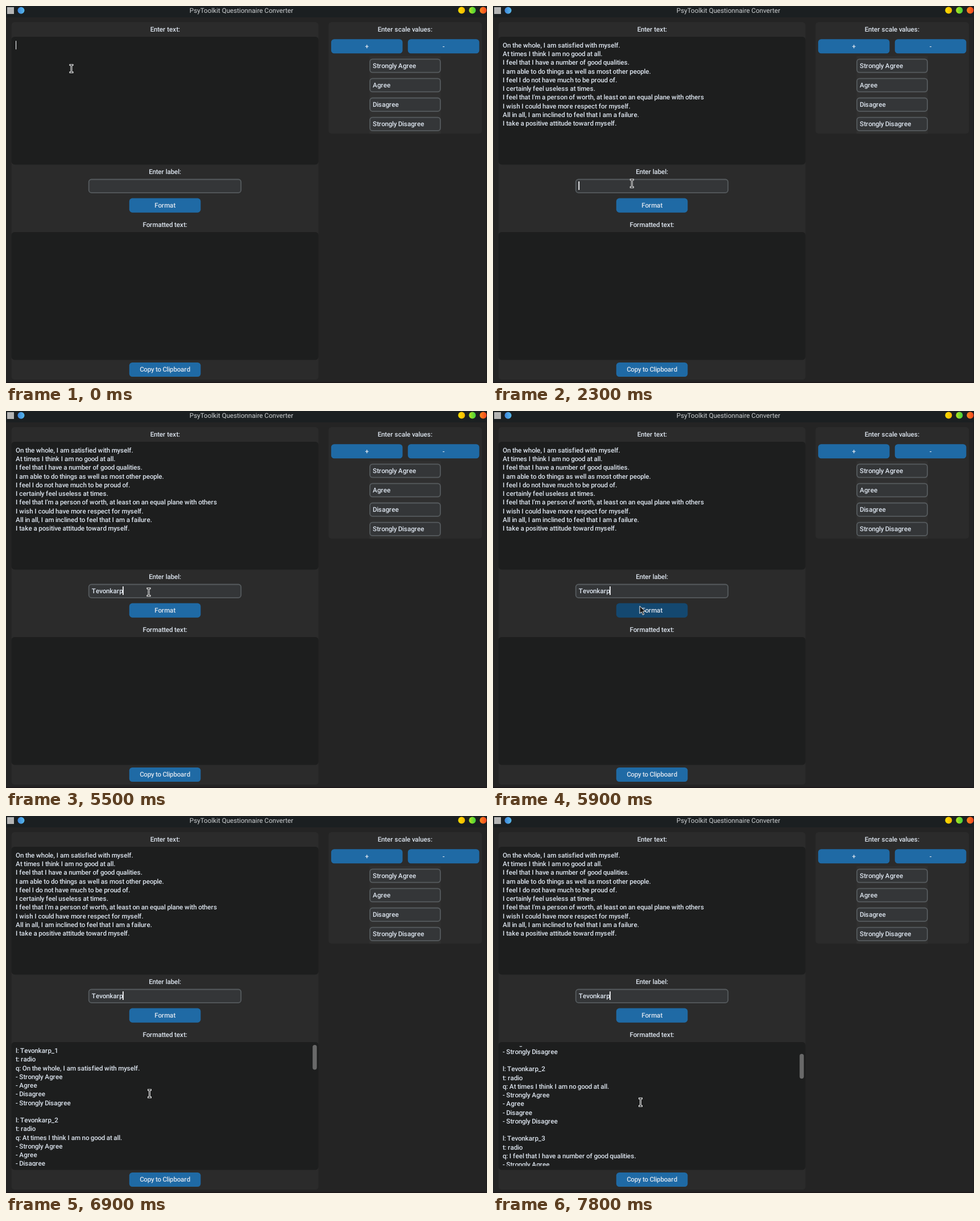
An HTML page that plays this animation: 846x662 px, repeating every 8 s.

```html
<!DOCTYPE html>
<html lang="en">
<head>
<meta charset="utf-8">
<title>PsyToolkit Questionnaire Converter</title>
<style>
  html, body { margin: 0; width: 846px; height: 662px; overflow: hidden; background: #242424; }
  svg { display: block; }
  text {
    font: 500 11.66px Roboto, sans-serif;
    fill: #dce4ee;
    text-rendering: geometricPrecision;
    white-space: pre;
  }
  .title { font-weight: 400; text-anchor: middle; fill: #cdd0d2; }
  .frame { fill: #2b2b2b; }
  .box { fill: #1d1e1e; }
  .button { fill: #1f6aa5; }
  .hover { fill: #144870; }
  .entry { fill: #343638; stroke: #565b5e; stroke-width: 1.8; }
  .caret { fill: #f4f6f8; }
</style>
</head>
<body>
<svg id="stage" width="846" height="662" viewBox="0 0 846 662">
  <defs>
    <linearGradient id="blue"><stop stop-color="#3f86dc"/><stop offset="1" stop-color="#56b8ea"/></linearGradient>
    <linearGradient id="yellow"><stop stop-color="#ffe000"/><stop offset="1" stop-color="#f7b500"/></linearGradient>
    <linearGradient id="green"><stop stop-color="#b4e61e"/><stop offset="1" stop-color="#3fd03c"/></linearGradient>
    <linearGradient id="red"><stop stop-color="#ff8a1c"/><stop offset="1" stop-color="#f2421f"/></linearGradient>
    <clipPath id="view"><rect x="12" y="404" width="525" height="210.5"/></clipPath>
    <path id="bar" d="M-2-6.6H2M0-6.6V6.6M-2 6.6H2"/>
  </defs>

  <rect width="846" height="20" fill="#1b1f21"/>
  <rect y="660" width="846" height="2" fill="#1d191b"/>
  <rect x="844.5" y="20" width="1.5" height="642" fill="#1e1e1e"/>
  <rect x="2" y="2" width="12" height="12" fill="#b4b4b4"/>
  <circle cx="26.5" cy="7.7" r="6" fill="url(#blue)"/>
  <circle cx="801.3" cy="7.6" r="6" fill="url(#yellow)"/>
  <circle cx="820.3" cy="7.6" r="6" fill="url(#green)"/>
  <circle cx="839.3" cy="7.6" r="6" fill="url(#red)"/>
  <text class="title" x="414" y="12">PsyToolkit Questionnaire Converter</text>

  <g id="ui"></g>
  <g id="typed"></g>
  <g clip-path="url(#view)"><g id="result"></g></g>
  <rect id="thumb" x="539.3" y="402" width="7.4" height="43.5" rx="3.7" fill="#696969"/>
  <rect id="textCaret" class="caret" width="1.1" height="15"/>
  <rect id="labelCaret" class="caret" y="308" width="1.8" height="15"/>

  <g id="beam" fill="none" stroke-linecap="square">
    <use href="#bar" stroke="#f2f2f2" stroke-width="3"/>
    <use href="#bar" stroke="#16181a" stroke-width="1"/>
  </g>
  <path id="arrow" d="M.5.5V13.5L3.7 10.8 6 16 8.3 15 6.2 10.1H10.6Z" fill="#16181a" stroke="#f2f2f2" stroke-linejoin="round"/>
</svg>

<script>
const $ = id => document.getElementById(id);
const LOOP = 8000, ZOOM = .897, LINE = 17 * ZOOM;
const NAME = 'Tevonkarp';
const scale = ['Strongly Agree', 'Agree', 'Disagree', 'Strongly Disagree'];
const items = [
  'On the whole, I am satisfied with myself.',
  'At times I think I am no good at all.',
  'I feel that I have a number of good qualities.',
  'I am able to do things as well as most other people.',
  'I feel I do not have much to be proud of.',
  'I certainly feel useless at times.',
  "I feel that I'm a person of worth, at least on an equal plane with others",
  'I wish I could have more respect for myself.',
  'All in all, I am inclined to feel that I am a failure.',
  'I take a positive attitude toward myself.'
];

// The toolkit sets 13px glyphs at whole-pixel advances; the window is then scaled
const pen = document.createElement('canvas').getContext('2d');
pen.font = '500 130px Roboto, sans-serif';
const advance = ch => Math.round(pen.measureText(ch).width / 10) * ZOOM;
const widthOf = str => [...str].reduce((sum, ch) => sum + advance(ch), 0);

function add(parent, tag, attrs, content = '') {
  const el = document.createElementNS('http://www.w3.org/2000/svg', tag);
  for (const key in attrs) el.setAttribute(key, attrs[key]);
  el.textContent = content;
  return parent.appendChild(el);
}
const ui = $('ui');
const rect = (cls, x, y, width, height, rx = 5.4) =>
  add(ui, 'rect', { class: cls, x, y, width, height, rx });
function text(str, x, y, parent = ui) {
  const xs = [...str].map((ch, i) => x + widthOf(str.slice(0, i)));
  return add(parent, 'text', { x: xs.join(' '), y }, str);
}
const centered = (str, x, y) => text(str, x - widthOf(str) / 2, y);
const entry = (x, y, w) => rect('entry', x + .9, y + .9, w - 1.8, 23.3, 4.5);
function button(str, x, y) {
  const el = rect('button', x, y, 125.6, 25.1);
  centered(str, x + 62.8, y + 16.5);
  return el;
}
const lines = (list, y, parent) =>
  list.forEach((str, i) => text(str, 17, y + i * LINE, parent));

rect('frame', 9.6, 28.3, 540, 627.7);
rect('box', 9.6, 54, 540, 224.4);
rect('box', 9.6, 397, 540, 224.4);
centered('Enter text:', 279.7, 45);
centered('Enter label:', 279.4, 294.8);
centered('Formatted text:', 279.5, 388);
entry(144.8, 303.6, 269.4);
const format = button('Format', 216.8, 337.6);
button('Copy to Clipboard', 216.8, 625.9);

rect('frame', 567.2, 28.3, 270, 195.9);
centered('Enter scale values:', 701.8, 45);
button('+', 571.9, 58.2);
button('-', 706.8, 58.2);
add(ui, 'rect', { x: 639.2, y: 88, width: 125.6, height: 136.2, fill: '#303030' });
scale.forEach((str, i) => {
  const y = 92.4 + i * 34.1;
  entry(639.2, y, 125.6);
  text(str, 645, y + 16.2);
});
const label = text(NAME, 150.8, 319.8);

lines(items, 73, $('typed'));
lines(items.flatMap((q, i) => [
  `l: ${NAME}_${i + 1}`, 't: radio', 'q: ' + q, ...scale.map(s => '- ' + s), ''
]), 416.2, $('result'));

// Times at which each letter of the label is typed
const keys = [3200, 3400, 3500, 3700, 3800, 4300, 4400, 4600, 4900];

// Pointer stops: time, x, y
const path = [
  [0, 115, 110], [1700, 119, 118], [1800, 150, 172], [1900, 203, 250],
  [2000, 237, 306], [2100, 244.3, 311.7], [2700, 250, 312.8],
  [5500, 251, 318], [5600, 255, 338.5], [5700, 257.5, 342],
  [6700, 256, 356], [6800, 252, 428], [6900, 252.5, 487.5],
  [7000, 254, 497], [7100, 255.5, 501], [7400, 257, 502], [7600, 259.5, 502.7]
];

const within = (t, from, to) => t >= from && t < to;
const show = (el, on) => el.setAttribute('visibility', on ? 'visible' : 'hidden');

function draw(t) {
  const pasted = t >= 1200, formatted = t >= 6100;
  show($('typed'), pasted);
  show($('result'), formatted);
  show($('thumb'), formatted);

  const textCaret = $('textCaret');
  textCaret.setAttribute('x', pasted ? 217.9 : 17);
  textCaret.setAttribute('y', pasted ? 198.2 : 61.2);
  show(textCaret, t < 100 || within(t, 400, 1000) || within(t, 1500, 2000));

  const typed = NAME.slice(0, keys.filter(k => t >= k).length);
  if (label.textContent !== typed) label.textContent = typed;
  $('labelCaret').setAttribute('x', 150.3 + widthOf(typed));
  show($('labelCaret'), t >= 2300 && (t - 2300) % 900 < 600);

  const scroll = 50 * ZOOM * ((t >= 7500) + (t >= 7700));
  $('result').setAttribute('transform', `translate(0 ${-scroll})`);
  $('thumb').setAttribute('y', 402 + scroll * .175);

  const [, x, y] = path.findLast(p => t >= p[0]);
  const onArrow = within(t, 5600, 6800);
  const pointer = `translate(${x} ${y})`;
  $('arrow').setAttribute('transform', pointer);
  $('beam').setAttribute('transform', pointer);
  show($('arrow'), onArrow);
  show($('beam'), !onArrow);

  // A click flashes the button back to its normal colour
  const hover = onArrow && !within(t, 6100, 6200);
  format.setAttribute('class', hover ? 'hover' : 'button');
}

const start = performance.now();
function tick() {
  draw((performance.now() - start) % LOOP);
  requestAnimationFrame(tick);
}
tick();
</script>
</body>
</html>
```
